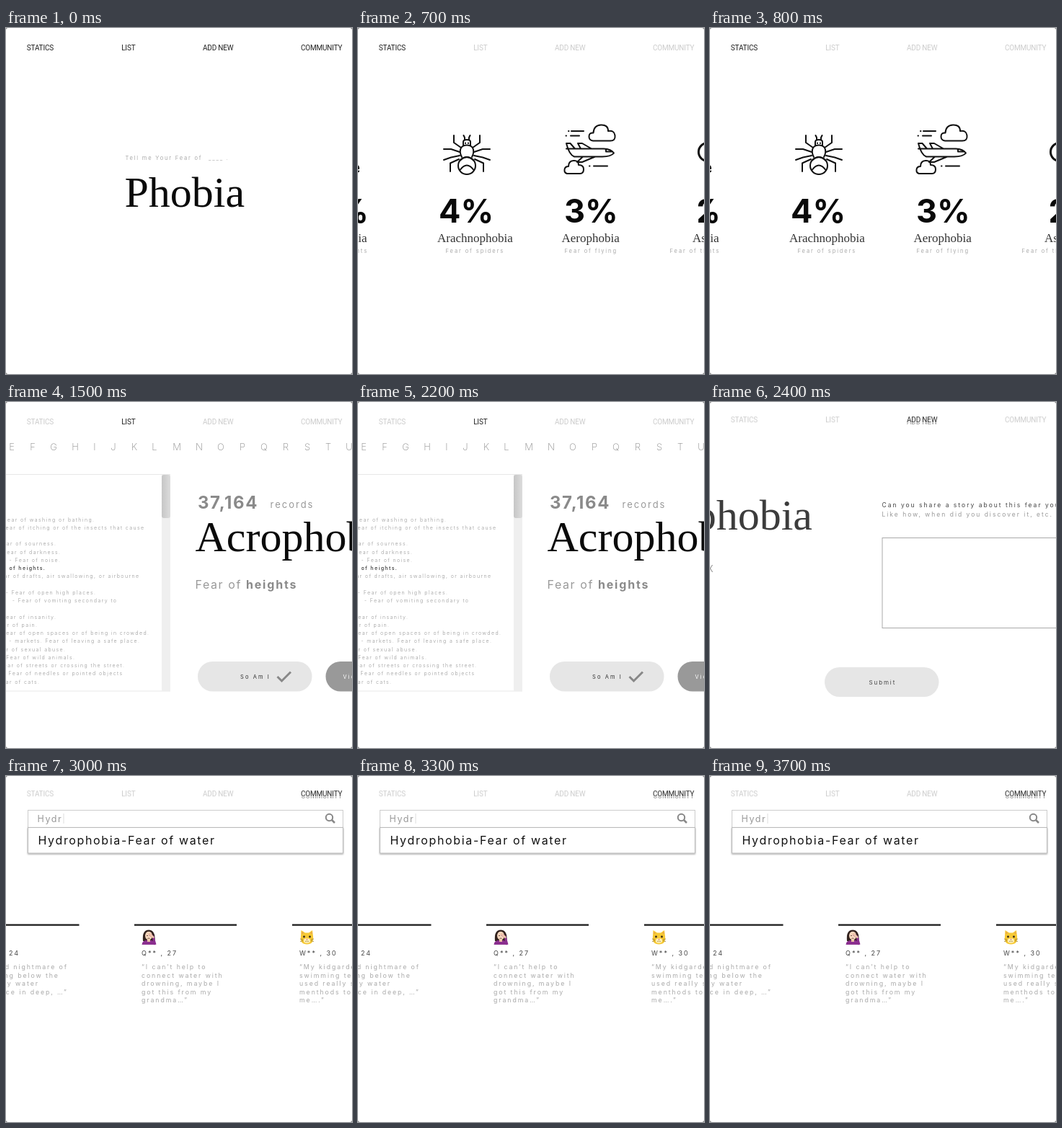
An HTML page for the animation above (4.9 s loop, 480 by 480 pixels).

```html
<!DOCTYPE html>
<html lang="en">
<head>
<meta charset="utf-8">
<title>Phobia</title>
<style>
html, body { margin: 0; width: 100%; height: 100%; overflow: hidden; background: #777; }
svg { display: block; width: 100vw; height: 100vh; }
text { font-family: Inter, sans-serif; white-space: pre; }
.serif { font-family: "Liberation Serif", serif; font-size: 17px; fill: #333; }
.title { font-size: 60px; fill: #0a0a0a; }
.line { fill: none; stroke: #111; stroke-width: 2; stroke-linecap: round; stroke-linejoin: round; }
.end { text-anchor: end; }

#nav text { font: 10px Roboto, sans-serif; letter-spacing: -.2px; fill: #ccc; }
#nav, #nav text, .page { animation: 4.9s step-end infinite; }
#nav { animation-name: lift; }
#nav .n1 { animation-name: n1; }
#nav .n2 { animation-name: n2; }
#nav .n3 { animation-name: n3; }
#nav .n4 { animation-name: n4; }
@keyframes lift { 0% { transform: none } 46.939%, 100% { transform: translateY(-2.8px) } }
@keyframes n1 { 0% { fill: #222 } 30.612%, 100% { fill: #ccc } }
@keyframes n2 { 0% { fill: #222 } 14.286% { fill: #ccc } 30.612% { fill: #222 } 46.939%, 100% { fill: #ccc } }
@keyframes n3 { 0% { fill: #222 } 14.286% { fill: #ccc } 46.939% { fill: #222 } 61.224%, 100% { fill: #ccc } }
@keyframes n4 { 0% { fill: #222 } 14.286% { fill: #ccc } 61.224%, 100% { fill: #222 } }

.page { opacity: 0; }
#home { animation-name: home; }
#stats { animation-name: stats; }
#list { animation-name: list; }
#add { animation-name: add; }
#community { animation-name: community; }
@keyframes home { 0% { opacity: 1 } 14.286%, 100% { opacity: 0 } }
@keyframes stats { 0% { opacity: 0 } 14.286% { opacity: 1 } 30.612%, 100% { opacity: 0 } }
@keyframes list { 0% { opacity: 0 } 30.612% { opacity: 1 } 46.939%, 100% { opacity: 0 } }
@keyframes add { 0% { opacity: 0 } 46.939% { opacity: 1 } 61.224%, 100% { opacity: 0 } }
@keyframes community { 0% { opacity: 0 } 61.224%, 100% { opacity: 1 } }

.echo { font: 10px Roboto, sans-serif; letter-spacing: -.2px; fill: #999; clip-path: url(#feet); }
.tag { font-size: 7.5px; letter-spacing: 1.8px; fill: #aaa; }
.pct { font-size: 45px; font-weight: 700; fill: #0a0a0a; }
.fear { font-size: 7.5px; letter-spacing: 1.9px; fill: #aaa; }
#letters text { font-size: 13px; font-weight: 200; fill: #888; text-anchor: middle; }
#entries text { font-size: 7px; font-weight: 300; letter-spacing: 1.4px; fill: #999; text-anchor: end; }
#entries .on { font-weight: 500; fill: #333; }
.btn { font-size: 7.5px; letter-spacing: 2.1px; fill: #333; }
.ask { font-size: 8.5px; letter-spacing: 2px; fill: #444; }
.who { font-size: 9px; letter-spacing: 2px; fill: #444; }
.say text { font-size: 8.8px; letter-spacing: 1.9px; fill: #aaa; }
</style>
</head>
<body>
<svg viewBox="0 0 480 480">
  <defs>
    <clipPath id="feet"><rect x="260" y="28.8" width="220" height="3"/></clipPath>
    <linearGradient id="thumb"><stop stop-color="#c6c6c6"/><stop offset="1" stop-color="#dcdcdc"/></linearGradient>
    <filter id="drop" x="-5%" y="-20%" width="110%" height="150%">
      <feDropShadow dx="0" dy="1" stdDeviation="1" flood-color="#000" flood-opacity=".4"/>
    </filter>
  </defs>
  <rect width="480" height="480" rx="3" fill="#fff"/>

  <g id="nav">
    <text class="n1" x="28.8" y="30.6">STATICS</text>
    <text class="n2" x="160.2" y="30.6">LIST</text>
    <text class="n3" x="273" y="30.6">ADD NEW</text>
    <text class="n4" x="409" y="30.6">COMMUNITY</text>
  </g>

  <g id="home" class="page">
    <text class="tag" x="165.5" y="183.4">Tell me Your Fear of</text>
    <text class="tag" x="281" y="183.4">____</text>
    <text class="tag" x="305.5" y="183.4">.</text>
    <text class="serif title" x="164.5" y="247.5">Phobia</text>
  </g>

  <g id="stats" class="page">
    <g class="line">
      <path d="M-4 195H1Q1 190.500 -3 190.500M-4 199.500Q-1 200.500 1 198.500"/>
      <circle cx="151" cy="191" r="12"/>
      <path d="M142 183.500Q151 175 160 183.500M141.500 197Q151 184 160.500 197"/>
      <path d="M144 179Q140 172 143 166Q146 162.500 151 162.500T159 166Q162 172 158 179"/>
      <path d="M146 163V158Q146 155 151 155T156 158V163M148 155V152L146.500 149M154 155V152L155.500 149M149 159.500V160M153 159.500V160"/>
      <path id="legs" d="M133 149V159L143 166M119 168H129L141 172M119 183L129 179.500L141 177M128 199V187.500L140 182"/>
      <use href="#legs" transform="matrix(-1 0 0 1 302 0)"/>
      <path d="M326 156.500Q320.500 156 320.500 150.500T326.500 145.500Q327 135 337 134.500T347 143Q355.500 141.500 356.500 149T350 156.500Z"/>
      <path d="M290 202Q286 201 286.500 196.500T292 192Q292 184.500 299 184T306 190Q313 190 313 196T308 202Z"/>
      <path d="M289 160H294.500L301 167.500H341Q351 168 355 173.500Q351 178.500 339 178.500H300Q293 176 289 160ZM305 160H311L324 167.500M305 160L309 167.500M312 178.500L304 186H311L329 178.500M289 167.500H300M344 168V171.500H353"/>
      <path d="M296 143H313M292 143H292.500M295 149.500H307M288.500 149.500H289M327 191.500H346M321 191.500H321.500"/>
      <circle cx="485" cy="172" r="12.500" stroke-width="3"/>
    </g>
    <text class="pct" x="-31" y="269.500">%</text>
    <text class="pct" x="112" y="269.500">4%</text>
    <text class="pct" x="286" y="269.500">3%</text>
    <text class="pct" x="469.500" y="269.500">2%</text>
    <text class="serif end" x="12.500" y="297">Serpentophobia</text>
    <text class="serif" x="110" y="297">Arachnophobia</text>
    <text class="serif" x="282.500" y="297">Aerophobia</text>
    <text class="serif" x="464" y="297">Astraphobia</text>
    <text class="fear end" x="14" y="311.500">Fear of serpents</text>
    <text class="fear" x="121.500" y="311.500">Fear of spiders</text>
    <text class="fear" x="286.500" y="311.500">Fear of flying</text>
    <text class="fear" x="432.500" y="311.500">Fear of thunder</text>
  </g>

  <g id="list" class="page">
    <g id="letters"></g>
    <path d="M0 100.500H228M0 401H228" stroke="#e8e8e8"/>
    <rect x="216" y="101" width="12" height="300" fill="#efefef"/>
    <rect x="216" y="101" width="12" height="60" rx="3" fill="url(#thumb)"/>
    <g id="entries"></g>
    <text x="266" y="148" font-size="24" font-weight="700" letter-spacing="1.6" fill="#8a8a8a">37,164</text>
    <text x="366.500" y="147.300" font-size="13" letter-spacing="2" fill="#999">records</text>
    <text class="serif title" x="262.500" y="207">Acrophobia</text>
    <text x="262.500" y="258.800" font-size="16" letter-spacing="1.6" fill="#999">Fear of</text>
    <text x="333" y="258.800" font-size="16" font-weight="700" letter-spacing="1.8" fill="#8a8a8a">heights</text>
    <rect x="266" y="360" width="158.500" height="41.500" rx="20.500" fill="#e6e6e6"/>
    <text class="btn" x="325" y="383.500">So Am I</text>
    <path d="M376.500 381L382.500 387L395 374.500" fill="none" stroke="#888" stroke-width="3"/>
    <rect x="443.500" y="360" width="158.500" height="41.500" rx="20.500" fill="#999"/>
    <text class="btn" x="467.500" y="383.500" style="fill:#fff">View More</text>
  </g>

  <g id="add" class="page">
    <text class="echo" x="273" y="30.600">ADD NEW</text>
    <text class="serif title end" x="142" y="177" style="fill:#3c3c3c">Hydrophobia</text>
    <text x="-4" y="235.500" font-size="12.500" fill="#999">X</text>
    <text class="ask" x="238.500" y="146">Can you share a story about this fear you have?</text>
    <text class="ask" x="238.500" y="158.500" style="fill:#999">Like how, when did you discover it, etc.</text>
    <rect x="239" y="188.500" width="260" height="125" fill="none" stroke="#aaa"/>
    <rect x="159" y="368" width="158.500" height="41" rx="20.500" fill="#e6e6e6"/>
    <text x="220.500" y="391.800" font-size="8" letter-spacing="1.9" fill="#444">Submit</text>
  </g>

  <g id="community" class="page">
    <text class="echo" x="409" y="30.600">COMMUNITY</text>
    <rect x="30.500" y="47.500" width="437" height="24" fill="#fff" stroke="#ccc"/>
    <text x="43.500" y="63.700" font-size="12.500" letter-spacing="1.6" fill="#999">Hydr</text>
    <path d="M80 52V66" stroke="#ddd"/>
    <g fill="none" stroke="#888" stroke-width="2">
      <circle cx="448.500" cy="57.500" r="4.700"/>
      <path d="M452 61L456 65" stroke-width="2.500"/>
    </g>
    <rect x="30.500" y="71.500" width="437" height="35.500" fill="#fff" stroke="#bbb" filter="url(#drop)"/>
    <text x="44.500" y="95" font-size="16" letter-spacing="1.65" fill="#111">Hydrophobia-Fear of water</text>
    <path d="M0 206.700H101.500M178 206.700H320M397 206.700H480" stroke="#1a1a1a" stroke-width="2.200"/>

    <g>
      <path d="M190 229Q188.500 213.500 198 213.500T206.500 229Z" fill="#33231f"/>
      <path d="M188.500 234Q188.500 227.500 198 227.500T207.500 234Z" fill="#8b2f8f"/>
      <rect x="196" y="225" width="4" height="5" fill="#e8bfa2"/>
      <ellipse cx="198" cy="221.500" rx="5" ry="6" fill="#f5d6bd"/>
      <path d="M192.500 220Q194 215.500 198 215.500T203.500 220Q203 213.800 198 214T192.500 220Z" fill="#33231f"/>
      <path d="M195 221.500H197M196.500 225.500Q198 224.500 199.500 225.500" stroke="#55352c" fill="none" stroke-width=".8"/>
      <path d="M207 234L204 223L199 219.500" fill="none" stroke="#8b2f8f" stroke-width="3"/>
      <path d="M204 223.500L199 219" stroke="#f0c8aa" stroke-width="3" stroke-linecap="round"/>
    </g>
    <g>
      <path d="M409 222L409.500 214L415 217.500H420L425 214L426 222Q427.500 233.500 417.500 233.500T409 222Z" fill="#f6c935"/>
      <path d="M410.500 219V216L413 218ZM424.500 219V216L422 218Z" fill="#e59a55"/>
      <ellipse cx="417.500" cy="228.500" rx="4.500" ry="3.200" fill="#fff1bd"/>
      <circle cx="413.500" cy="223" r="1.400" fill="#33281a"/>
      <circle cx="421.500" cy="223" r="1.400" fill="#33281a"/>
      <path d="M416 226H419L417.500 227.500Z" fill="#d9776a"/>
      <path d="M415 229Q416.500 230.500 417.500 228.500Q418.500 230.500 420 229M408 226L412 227M408 229.500L412 228.500M427 226L423 227M427 229.500L423 228.500" fill="none" stroke="#8a6a20" stroke-width=".7"/>
    </g>

    <text class="who" x="4" y="248.700">24</text>
    <text class="who" x="188" y="248.700">Q** , 27</text>
    <text class="who" x="407" y="248.700">W** , 30</text>
    <g class="say" id="say"></g>
  </g>
</svg>
<script>
const NS = "http://www.w3.org/2000/svg";
function put(id, str, x, y, cls = "") {
  const t = document.createElementNS(NS, "text");
  t.textContent = str;
  t.setAttribute("x", x);
  t.setAttribute("y", y);
  t.setAttribute("class", cls);
  document.getElementById(id).append(t);
}

const centers = [8, 37, 66, 96, 123, 149, 178, 206, 237, 268, 298, 328, 358, 388, 418, 447, 476];
centers.forEach((x, i) => put("letters", "EFGHIJKLMNOPQRSTU"[i], x, 66.8));

// [row, right edge, text]
const entries = [
  [0, 122, "- Fear of washing or bathing."],
  [1, 191, "- Fear of itching or of the insects that cause"],
  [3, 69, "- Fear of sourness."],
  [4, 75, "- Fear of darkness."],
  [5, 75, "- Fear of noise."],
  [6, 54, "- Fear of heights."],
  [7, 184, "- Fear of drafts, air swallowing, or airbourne"],
  [9, 124, "- Fear of open high places."],
  [10, 153, "- Fear of vomiting secondary to"],
  [12, 69, "- Fear of insanity."],
  [13, 43, "- Fear of pain."],
  [14, 198, "- Fear of open spaces or of being in crowded."],
  [15, 185, "- markets. Fear of leaving a safe place."],
  [16, 82, "- Fear of sexual abuse."],
  [17, 95, "- Fear of wild animals."],
  [18, 164, "- Fear of streets or crossing the street."],
  [19, 161, "- Fear of needles or pointed objects"],
  [20, 46, "- Fear of cats."]
];
for (const [row, x, str] of entries)
  put("entries", str, x + 1.4, 165.5 + row * 11.25, row === 6 ? "on" : "");

const sayY = i => 268.2 + i * 11.45;
[["d nightmare of", 84], ["ng below the", 72], ["y water", 44], ["ce in deep, …”", 84]]
  .forEach(([str, x], i) => put("say", str, x + 1.9, sayY(i), "end"));
["“I can’t help to", "connect water with", "drowning, maybe I", "got this from my", "grandma…”"]
  .forEach((str, i) => put("say", str, 188, sayY(i)));
["“My kidgarden", "swimming teacher", "used really strict", "menthods to teach", "me….”"]
  .forEach((str, i) => put("say", str, 407, sayY(i)));
</script>
</body>
</html>
```
